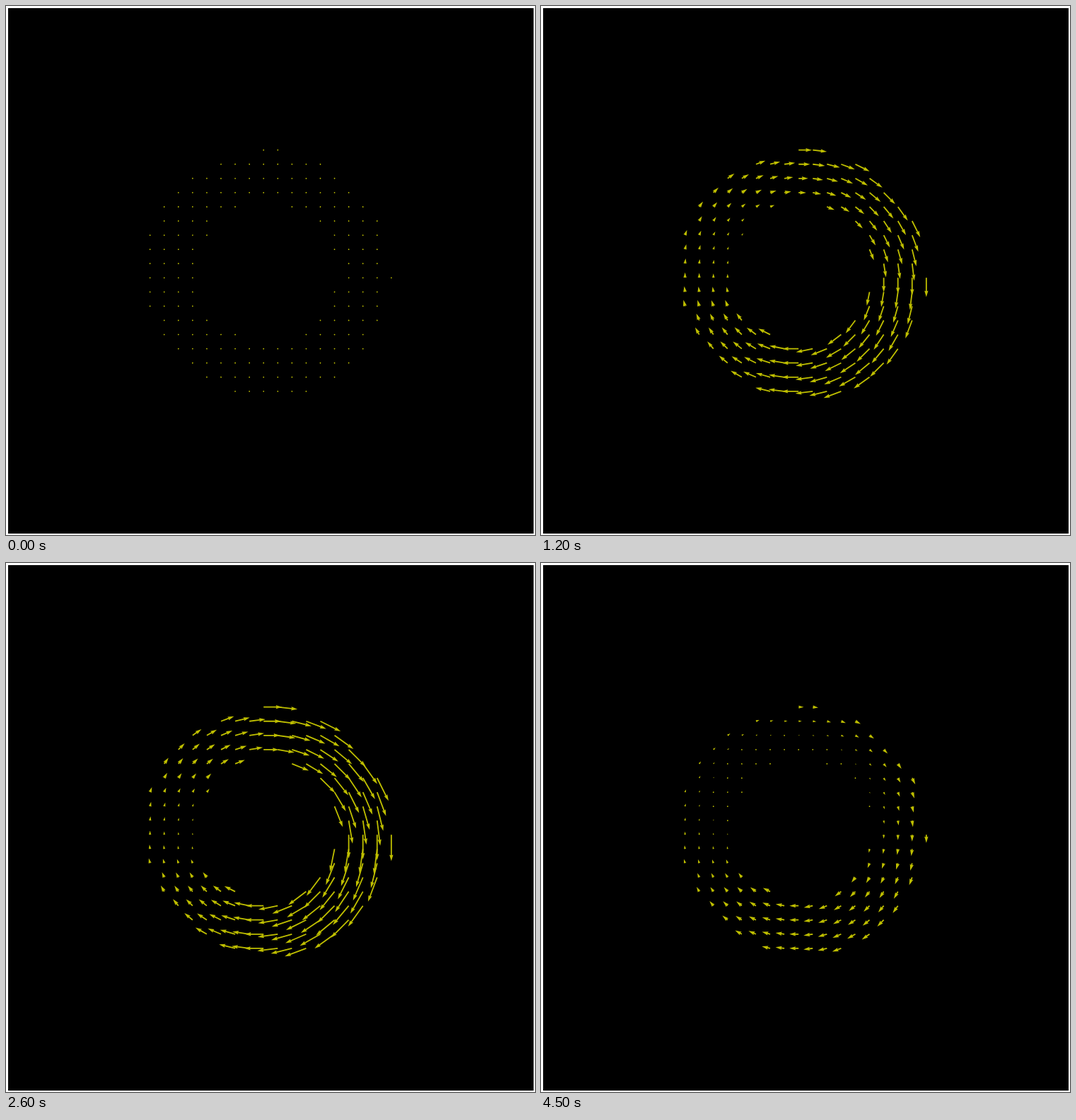
An HTML page with a canvas that plays this animation: 748x748 px, repeating every 4600 ms.

```html
<!DOCTYPE html>
<html lang="en">
<head>
<meta charset="utf-8">
<title>Rotating ring field</title>
<style>
html, body { margin: 0; width: 100%; height: 100%; overflow: hidden; background: #fff; }
canvas { display: block; }
</style>
</head>
<body>
<canvas id="stage" width="748" height="748"></canvas>
<script>
const ctx = document.getElementById('stage').getContext('2d');
const LOOP = 4600, STEP = 100;
const CX = 364.2, CY = 384.3, GAP = 20.07, WIDTH = 1.8;
const INNER = 5.7, OUTER = 8.4; // radii between which lengths are blended

// The ring lies between two slightly offset circles, in grid units
const inCircle = (x, y, cx, cy, r2) => (x - cx) ** 2 + (y - cy) ** 2 < r2;
const points = [];
for (let y = -9; y <= 9; y++) {
  for (let x = -9; x <= 9; x++) {
    if (inCircle(x, y, 0.28, -0.3, 76.4) && !inCircle(x, y, 0.2, -0.4, 23.8)) points.push({ x, y });
  }
}

const lerp = (a, b, u) => a + (b - a) * u;

// Rises to 1 at the peak time and decays more slowly
function pulse(t, peak, sharpness) {
  const x = t / peak;
  return (x * Math.exp(1 - x)) ** sharpness;
}

// Arrow length: a common swell plus lobes to the right and to the bottom
function lengthField(t) {
  const swell = Math.sin(Math.PI * t / 4.85);
  const mean = [21 * swell, 24 * swell ** 0.7];
  const right = [17.5 * pulse(t, 2.1, 7.1), 17 * pulse(t, 2.1, 4.9)];
  const down = 7.5 * (1 - Math.exp(-((t / 0.85) ** 3))) - 5.5 * pulse(t, 2.4, 14);
  const squeeze = 2.8 * pulse(t, 2.1, 3);
  return (radius, angle) => {
    const u = (radius - INNER) / (OUTER - INNER);
    return Math.max(0, lerp(...mean, u)
      + lerp(...right, u) * Math.cos(angle)
      + lerp(down, down / 2, u) * Math.sin(angle)
      - squeeze * Math.cos(2 * angle));
  };
}

function drawArrow(x, y, angle, length) {
  ctx.save();
  ctx.translate(x, y);
  ctx.rotate(angle);
  ctx.scale(WIDTH, WIDTH);
  ctx.beginPath();
  const len = length / WIDTH;
  if (len < 1) {
    ctx.arc(0, 0, 0.5, 0, 2 * Math.PI);
  } else {
    const s = Math.min(1, len / 5); // short arrows shrink as a whole
    const neck = len - 4.5 * s, back = len - 5 * s;
    ctx.moveTo(0, -0.5 * s);
    ctx.lineTo(neck, -0.5 * s);
    ctx.lineTo(back, -1.5 * s);
    ctx.lineTo(len, 0);
    ctx.lineTo(back, 1.5 * s);
    ctx.lineTo(neck, 0.5 * s);
    ctx.lineTo(0, 0.5 * s);
  }
  ctx.fill();
  ctx.restore();
}

function draw(ms) {
  const t = Math.floor(ms % LOOP / STEP) * STEP / 1000;
  const lengthAt = lengthField(t);
  ctx.fillStyle = '#fff';
  ctx.fillRect(0, 0, 748, 748);
  ctx.fillStyle = '#000';
  ctx.fillRect(3, 3, 743, 743);
  ctx.fillStyle = '#bfbf00';
  for (const { x, y } of points) {
    const angle = Math.atan2(y, x);
    drawArrow(CX + x * GAP, CY + y * GAP, angle + Math.PI / 2, lengthAt(Math.hypot(x, y), angle));
  }
}

const start = performance.now();
function tick() {
  draw(performance.now() - start);
  requestAnimationFrame(tick);
}
tick();
</script>
</body>
</html>
```
